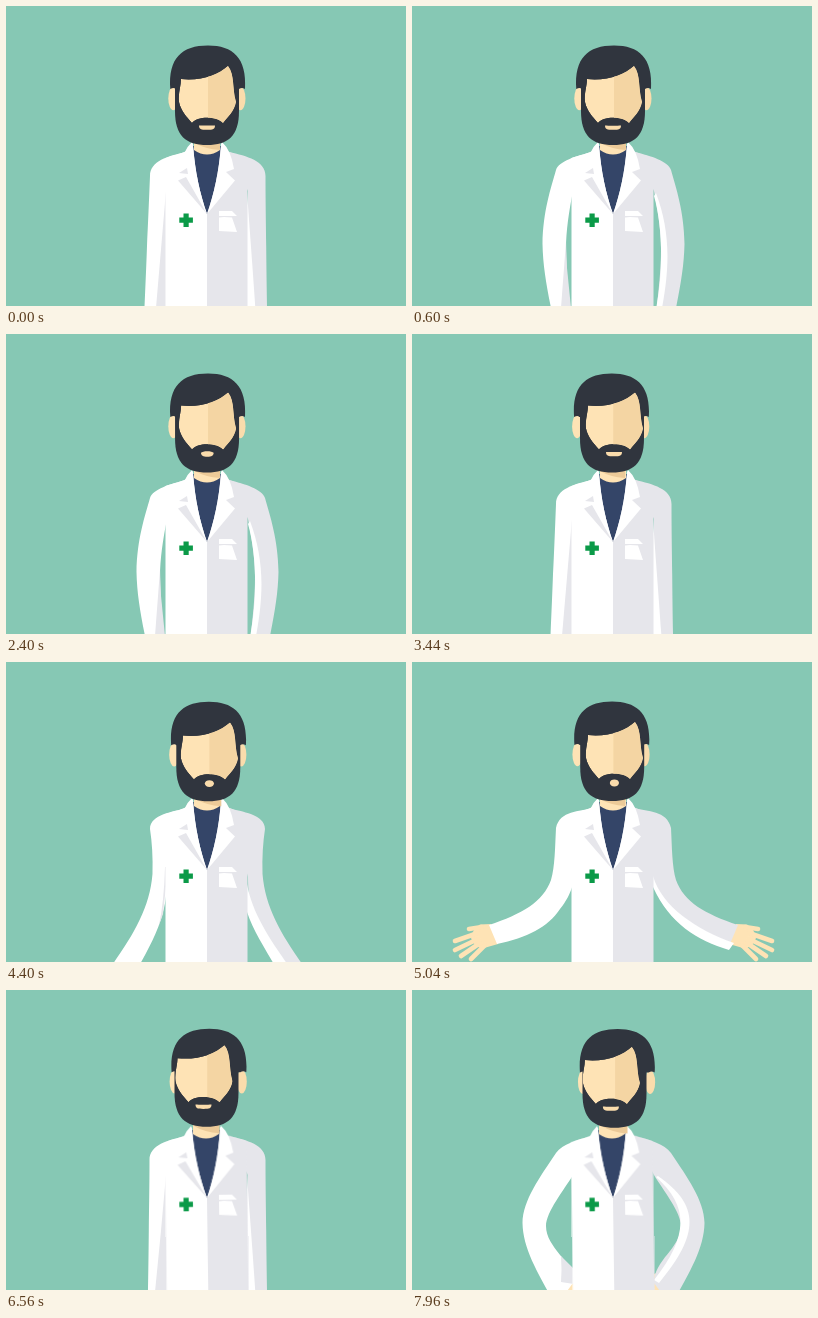
An HTML page that plays this animation: 400 px wide and 300 px high, repeating every 8000 ms.

```html
<!DOCTYPE html>
<html lang="en">
<head>
<meta charset="utf-8">
<title>Doctor</title>
<style>
@property --x { syntax: "<number>"; inherits: true; initial-value: 0; }
@property --y { syntax: "<number>"; inherits: true; initial-value: 0; }
@property --turn { syntax: "<number>"; inherits: true; initial-value: 0; }
@property --nod { syntax: "<number>"; inherits: true; initial-value: 0; }

:root {
  --skin: #fee3b5;
  --tan: #f4d5a3;
  --dark: #30353e;
  --white: #fff;
  --grey: #e6e6eb;
}
html, body { margin: 0; width: 100%; height: 100%; overflow: hidden; background: #86c8b4; }
svg { display: block; width: 100vw; height: 100vh; }

.skin { fill: var(--skin); }
.tan { fill: var(--tan); }
.lip { fill: #fadcac; }
.dark { fill: var(--dark); }
.white { fill: var(--white); }
.grey { fill: var(--grey); }

/* Arm poses: each part names its own shapes, one timeline drives them all */
.arm {
  --rest: path("M180 146C162 150 144 155 144 170C143 195 142 220 141 240C140 270 138 310 137 340L160 340C161 310 161 280 161 250C161 230 161 200 161 185Z");
  --tuck: path("M180 146C162 150 143.5 155 143.5 170C143.5 195 143 220 142.8 240C142.5 270 142 310 141 340L160 340C161 310 161 280 161 250C161 230 161 200 161 185Z");
  --bow: path("M180 146C164 150 147 155 144 164C139 182 131 205 130.5 238C131 262 135 282 141 312L159 312C158 295 154 270 154 243C154 225 157 205 161 185Z");
  --lift: path("M180 146C168 150 144 152 144 167C146 180 147 195 146.5 212C144 245 128 272 107 302L132 306C142 288 152 270 157 250C160 240 161 228 161 215Z");
  --open: path("M180 146C168 150 148 148 144 166C143 185 143 205 139 218C131 240 110 252 77 263L85 282C115 276 136 265 148 247C154 240 159 230 161 222Z");
  --hips: path("M180 146C164 150 151 154 144 163C128 187 111 210 110.5 233C111 258 124 280 144 316L161 293C161 270 134 258 134 236C134 222 152 200 161 185Z");
}
.right { --rest: var(--tuck); }
.shade {
  --rest: path("M160 185Q155 243 150 302L162 302L162 185Z");
  --tuck: path("M160 185Q155 243 149 302L162 302L162 185Z");
  --bow: path("M154 236Q152 262 149 302L159 302L155 262Z");
  --lift: path("M159 205Q158 240 153 263L157 252L162 205Z");
  --open: path("M162 230Q161 240 161 250L163 250L163 230Z");
  --hips: path("M149 266Q150 280 149 292L162 294L162 279Z");
}
.strip {
  --rest: path("M241 185C243 215 247 265 250 310L241 310C241 270 241 215 241 185Z");
  --tuck: var(--rest);
  --bow: path("M244 187C258 225 259 260 248 312L242 312C251 275 252 225 242 190Z");
  --lift: path("M241 222C246 250 262 275 284 306L270 306C258 285 247 268 241 250Z");
  --open: path("M241 214C250 245 285 268 322 281L317 288C285 278 258 262 241 225Z");
  --hips: path("M246 186C288 215 288 244 247 293L242 290C277 246 277 216 244 187Z");
}
.arm, .shade, .strip { d: var(--rest); animation: pose 8s infinite ease-in-out; }
@keyframes pose {
  0%, 39.5% { d: var(--rest); }
  7.5%, 34% { d: var(--bow); }
  52% { d: var(--rest); animation-timing-function: ease-in; }
  55% { d: var(--lift); animation-timing-function: ease-out; }
  62.5%, 63% { d: var(--open); }
  73%, 78.5% { d: var(--rest); }
  82% { d: var(--tuck); }
  89%, 100% { d: var(--hips); }
}

.hand { transform-origin: 81px 272px; animation: hand 8s infinite ease-in-out; }
@keyframes hand {
  0%, 39.5% { transform: translate(67px, 68px) rotate(-60deg); }
  52% { transform: translate(67px, 68px) rotate(-60deg); animation-timing-function: ease-in; }
  55% { transform: translate(39px, 34px) rotate(-30deg); animation-timing-function: ease-out; }
  62.5%, 63% { transform: translate(0px, 0px) rotate(0deg); }
  73%, 82% { transform: translate(67px, 68px) rotate(-60deg); }
  89%, 100% { transform: translate(75px, 22px) rotate(-150deg); }
}

.body { transform-origin: 201px 210px; animation: lean 8s infinite ease-in-out; }
@keyframes lean {
  0%, 78.5% { transform: rotate(0deg); }
  82%, 100% { transform: rotate(-.8deg); }
}

/* Head: a drift, a turn that slides face against hair, and a nod that lifts face and chin */
.head {
  transform: translate(calc(var(--x) * 1px), calc(var(--y) * 1px));
  animation: head 8s infinite ease-in-out;
}
.hair, .ears { transform: translateX(calc(var(--turn) * -.6px)); }
.beard { transform: translateY(calc(var(--nod) * .35px)); }
.face { transform: translate(calc(var(--turn) * 1px), calc(var(--nod) * 1px)); }
.side { transform: translateX(calc(var(--turn) * -.9px)); }
@keyframes head {
  0%, 7.5%, 17% { --x: 0; --y: 0; --turn: 0; --nod: 0; }
  3.5% { --x: -.7; --y: .5; --turn: .8; --nod: .6; }
  21% { --x: 0; --y: -.8; --turn: .5; --nod: -4; }
  24.5% { --x: 0; --y: -.3; --turn: 0; --nod: -1; }
  27.5% { --x: .3; --y: -.6; --turn: .4; --nod: -3; }
  31%, 41.5% { --x: 0; --y: 0; --turn: 0; --nod: -1; }
  43% { --x: -1; --y: 0; --turn: 2; --nod: -1.5; }
  45% { --x: -2; --y: 0; --turn: 2.4; --nod: -1; }
  48.5% { --x: 1.2; --y: 0; --turn: .2; --nod: 0; }
  52% { --x: 1; --y: 0; --turn: .4; --nod: 0; }
  55% { --x: 1.3; --y: .2; --turn: .7; --nod: .4; }
  59% { --x: .3; --y: .4; --turn: 1; --nod: .5; }
  62.5%, 63% { --x: -.8; --y: 0; --turn: 1.8; --nod: 0; }
  66.5% { --x: .8; --y: .4; --turn: .4; --nod: .5; }
  73%, 78.5% { --x: 0; --y: 0; --turn: 0; --nod: 0; }
  82% { --x: -.5; --y: -.8; --turn: -3; --nod: -4; }
  85.5% { --x: -.3; --y: -.5; --turn: -3; --nod: -3; }
  89%, 98.5% { --x: -.5; --y: -.8; --turn: -3; --nod: -3.6; }
  99.5%, 100% { --x: 1.5; --y: -.4; --turn: -3.6; --nod: -2.6; }
}

.mouth {
  --flat: path("M193 119.4C196 119.7 206 119.7 209 119.4C209 123.2 207 123.8 201 123.8C195 123.8 193 123.2 193 119.4Z");
  --round: path("M196.8 121C196.8 116.400 206 116.400 206 121C206 122.900 204 124.500 201.400 124.500C198.800 124.500 196.800 122.900 196.800 121Z");
  d: var(--flat);
  animation: talk 8s infinite ease-in-out;
}
@keyframes talk {
  0%, 3.5%, 7.5%, 17%, 19%, 23%, 27%, 31%, 41.5%, 43%, 47%, 51%, 53%, 57%, 60%,
  65%, 69%, 73%, 78.5%, 82%, 86%, 89%, 100% { d: var(--flat); }
  1.8%, 5.5%, 21%, 25%, 29%, 45%, 49%, 55%, 58.5%, 62.5%, 63%,
  67%, 71%, 80%, 84%, 87.5% { d: var(--round); }
}
</style>
</head>
<body>
<svg viewBox="0 0 400 300">
  <defs>
    <g id="hand" stroke="#fee3b5" stroke-width="4.6" stroke-linecap="round">
      <path class="skin" stroke="none" d="M79 262L68 262.5Q60 268 59 276Q62 286 72 286L86 282Z"/>
      <path fill="none" d="M70 265L57 267M66 271L43 279M66 277L43 288M68 281L49 294M73 283L59 297"/>
    </g>
    <path id="face" d="M175 73C195 75 212 69 222 60C229 69 226 82 230 96C228 106 222 110 217 117C211 110 191 110 186 117C180 110 175 105 173 96C172 87 175 80 175 73Z"/>
    <clipPath id="faceClip"><use href="#face"/></clipPath>
  </defs>

  <use href="#hand" class="hand"/>
  <path class="arm white"/>
  <path class="shade grey"/>

  <g transform="translate(403) scale(-1 1)">
    <use href="#hand" class="hand"/>
    <path class="arm right grey"/>
  </g>
  <path class="strip white"/>

  <g class="body">
    <path class="white" d="M185 142C177 148 168 149 159.5 152V312H202V142Z"/>
    <path class="grey" d="M217 142C225 148 233 149 241.5 152V312H201V142Z"/>
    <path fill="#344568" d="M187 140H215C213 166 208 188 201 208C194 188 189 166 187 140Z"/>
    <path class="skin" d="M188 128H214V144Q201 153 188 144Z"/>
    <path class="white" d="M186 136Q177 144 174 163L182 166L174 174L201 208C194 188 189 166 187 138Z"/>
    <path class="white" d="M216 136Q225 144 228 163L220 166L229 174.5L201 208C208 188 213 166 215 138Z"/>
    <path class="grey" d="M173 167L181 162L182 168ZM172 174.5L180 171L201 208Z"/>
    <path fill="#0b9a48" d="M177.5 207.5h5.200v4h4.200v5.200h-4.200v4.300h-5.200v-4.300h-4.200v-5.200h4.200z"/>
    <path class="white" d="M213 205H226L231 210H213ZM213 211.5L218 211L226 211.5L231 226L213 225Z"/>
  </g>

  <g class="head">
    <path fill="#ecca98" d="M189 134H214V144Q199 143 189 137Z"/>
    <g class="ears">
      <ellipse class="skin" cx="167.3" cy="92.5" rx="5" ry="11.800"/>
      <ellipse class="lip" cx="234.5" cy="92.5" rx="5" ry="11.800"/>
    </g>
    <path class="beard dark" d="M169 76V105C169 130 180 139 201 139C222 139 233 130 233 105V76Z"/>
    <path class="hair dark" d="M164.300 83C162 52 176 39.500 202 39.500C227 39.500 241 52 239 83Q236 81 233 83H169.500Q168 81 164.300 83Z"/>
    <g class="face">
      <g clip-path="url(#faceClip)">
        <use href="#face" class="skin"/>
        <rect class="side tan" x="202" y="50" width="40" height="80"/>
      </g>
      <path class="mouth lip"/>
    </g>
  </g>
</svg>
</body>
</html>
```
